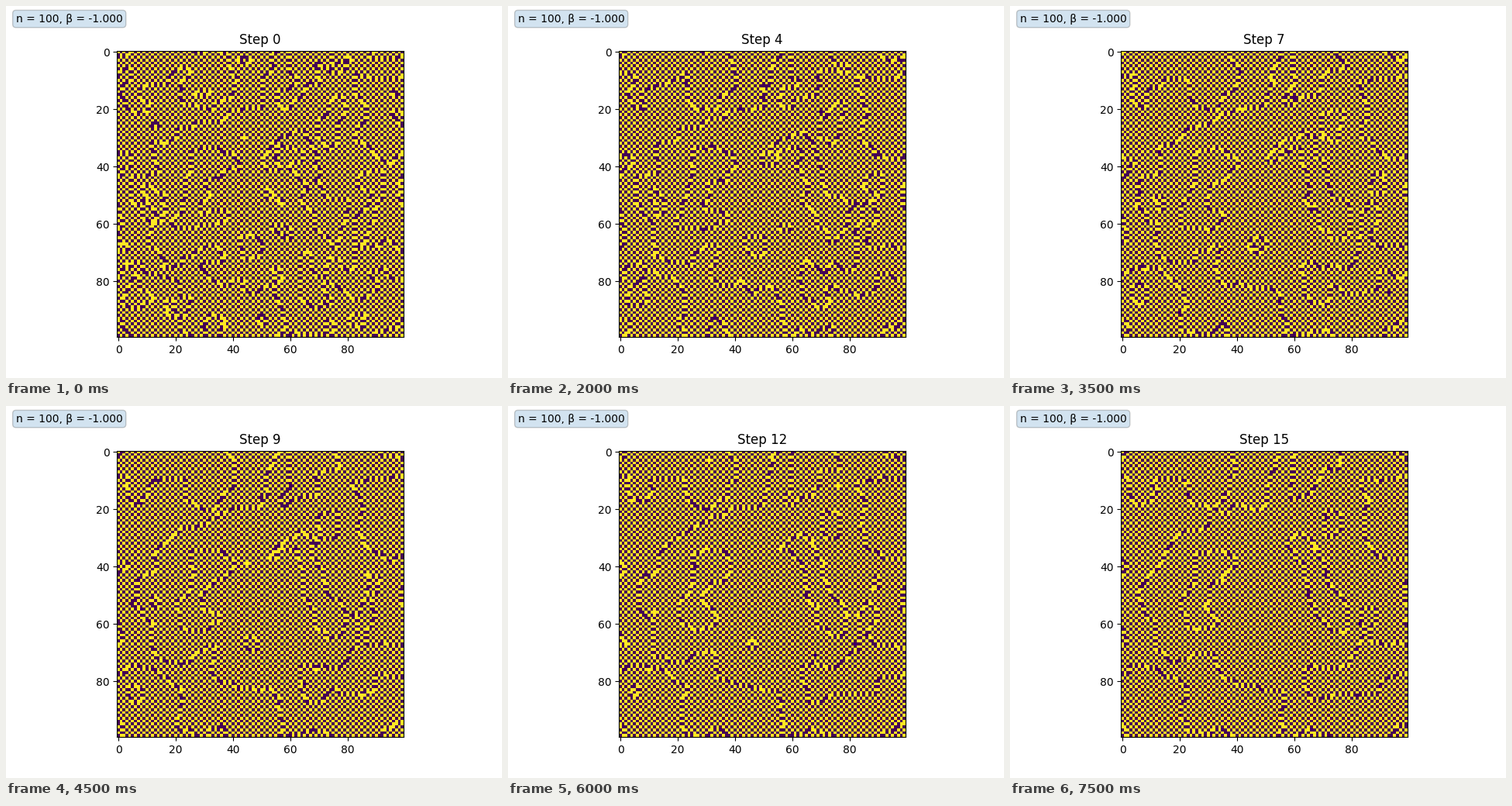
Write a matplotlib script that moves like this. It is 640 by 480 pixels and loops after 8000 ms.

```python
import numpy as np
import matplotlib.pyplot as plt
from matplotlib.animation import FuncAnimation

N = 100
BETA = -1.0
STEPS = 16
WARMUP = 9

rng = np.random.default_rng(4)
rows, cols = np.indices((N, N))
parity = (rows + cols) % 2


def sweep(spins):
    """One heat-bath sweep of the Ising lattice with periodic edges."""
    for half in (0, 1):
        field = sum(np.roll(spins, d, axis) for axis in (0, 1) for d in (1, -1))
        p_down = 1 / (1 + np.exp(2 * BETA * field))
        drawn = np.where(rng.random((N, N)) < p_down, -1, 1)
        spins = np.where(parity == half, drawn, spins)
    return spins


def simulate():
    spins = rng.choice([1, -1], (N, N))
    for _ in range(WARMUP):
        spins = sweep(spins)
    states = [spins]
    while len(states) < STEPS:
        states.append(sweep(states[-1]))
    return states


states = simulate()

fig, ax = plt.subplots(figsize=(6.4, 4.8), dpi=100)
image = ax.imshow(states[0], vmin=-1, vmax=1, cmap="viridis")
title = ax.set_title("Step 0")
fig.text(0.02, 0.98, f"n = {N}, β = {BETA:.3f}", va="top",
         bbox=dict(boxstyle="round", facecolor="tab:blue", alpha=0.2))


def update(step):
    image.set_data(states[step])
    title.set_text(f"Step {step}")
    return image, title


anim = FuncAnimation(fig, update, frames=STEPS, interval=500,
                     repeat=True, repeat_delay=0, blit=False)
plt.show()
```
